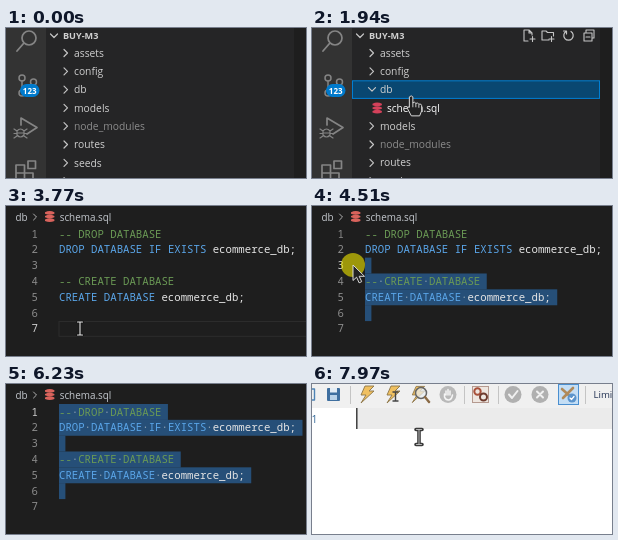
Recreate the animation shown at these times as an HTML page. Size 300 by 150 pixels, loop 8 s.

```html
<!DOCTYPE html>
<html lang="en">
<head>
<meta charset="utf-8">
<title>Schema walkthrough</title>
<style>
html, body { margin: 0; width: 100%; height: 100%; overflow: hidden; background: #1e1e1e; }
svg { display: block; width: 100vw; height: 100vh; }
text { white-space: pre; }
.ui { font: 10.3px "Open Sans", "Noto Sans", sans-serif; fill: #d0d0d0; }
.code { font: 500 10.68px "Noto Sans Mono", "DejaVu Sans Mono", monospace; fill: #e4e4e4; }
.line { fill: none; stroke-linecap: round; stroke-linejoin: round; }
</style>
</head>
<body>
<svg id="stage" viewBox="0 0 300 150"></svg>
<script>
const LOOP = 8000;
const CHAR = 6.408, CODE_X = 53, CODE_TOP = 20, LINE = 15.83, ROW = 18.3;
const stage = document.getElementById('stage');
const $ = id => document.getElementById(id);
const show = (id, on) => $(id).setAttribute('visibility', on ? 'visible' : 'hidden');
const clamp = (v, lo, hi) => Math.min(hi, Math.max(lo, v));
const between = (t, a, b) => t >= a && t < b;

// ---- drawing helpers ----
const rect = (x, y, w, h, fill, more = '') =>
  `<rect x="${x}" y="${y}" width="${w}" height="${h}" fill="${fill}" ${more}/>`;
const line = (d, color, width = 1.2, more = '') =>
  `<path class="line" d="${d}" stroke="${color}" stroke-width="${width}" ${more}/>`;
const shape = (d, fill, more = '') => `<path d="${d}" fill="${fill}" ${more}/>`;
const disc = (x, y, r, fill, more = '') => `<circle cx="${x}" cy="${y}" r="${r}" fill="${fill}" ${more}/>`;
const label = (x, y, s, more = '') => `<text class="ui" x="${x}" y="${y}" ${more}>${s}</text>`;
const group = (id, body, more = '') => `<g id="${id}" ${more}>${body}</g>`;
const chevron = (x, y, open) =>
  line(open ? `M${x - 3.5} ${y - 2}l3.5 3.5 3.5-3.5` : `M${x - 2} ${y - 3.5}l3.5 3.5-3.5 3.5`, '#c5c5c5');
const database = (x, y, color) => [0, 3.6, 7.2].map(dy =>
  shape(`M${x} ${y + dy + 1.3}q4.700-2.400 9.400 0v1.400q-4.700 2.300-9.400 0z`, color)).join('');

// ---- file tree ----
const rowY = i => 25 + ROW * i;
const folder = (name, i, open) => chevron(60, rowY(i), open) +
  label(68, rowY(i) + 3.7, name, name === 'node_modules' ? 'style="fill:#8c8c8c"' : '');
const selectedRow = (id, i) => rect(40.5, rowY(i) - 8.8, 247, 17.6, '#094771', `id="${id}" stroke="#007fd4"`);

function activityBar() {
  const c = '#858585';
  return rect(0, 0, 40, 150, '#333') +
    disc(23, 10, 7, 'none', `stroke="${c}" stroke-width="1.7"`) + line('M17.5 15.5L11 23', c, 1.8) +
    [[16, 50], [27.5, 54], [16, 65]].map(([x, y]) =>
      disc(x, y, 3, 'none', `stroke="${c}" stroke-width="1.5"`)).join('') +
    line('M16 53v9M27.5 57q-1 4-11 4', c, 1.5) +
    rect(14, 56, 19.5, 13, '#007acc', 'rx="6.5"') +
    label(23.7, 65.6, '123', 'text-anchor="middle" style="font-size:8px;font-weight:700;fill:#fff"') +
    line('M15 97V90L31 99.5 21 106', c, 1.7) +
    line('M11 103q3.5-4 7 0v4q-3.5 4-7 0zM11 105h7M8 101l3 2M8 105.5h3M8 110l3-2M21 101l-3 2M21 105.5h-3M21 110l-3-2', c, 1.2) +
    line('M10 137h8.5v16H10zM10 145h17v8M22 133h7.5v7.5h-7.5z', c, 1.7);
}

function headerIcons() {
  const c = '#c5c5c5';
  return group('headerIcons',
    line('M216 13h-4V2h5l3 3v2M217 2v3h3M218 11h5M220.5 8.5v5', c, 1.1) +
    line('M237 12h-7V3h4l1.5 1.5h6V8M237 11h5M239.5 8.5v5', c, 1.1) +
    line('M254 3.5a4.7 4.7 0 1 0 5 0M251.5 3h3v3', c, 1.2) +
    line('M274 4V2h8v8h-2M272 5h8v8h-8zM274 9h4', c, 1.1));
}

function explorer() {
  const head = ['assets', 'config'], tail = ['models', 'node_modules', 'routes', 'seeds'];
  return group('explorer',
    rect(0, 0, 300, 150, '#1e1e1e') + rect(40, 0, 248, 150, '#252526') + activityBar() +
    chevron(48, 8, true) + label(57, 11.2, 'BUY-M3', 'style="font-size:9.1px;font-weight:700"') + headerIcons() +
    selectedRow('dbSelected', 2) + selectedRow('fileSelected', 3) +
    rect(40, rowY(3) - 9, 248, 18, '#2a2d2e', 'id="fileHover"') +
    head.map((n, i) => folder(n, i)).join('') +
    group('dbClosed', folder('db', 2)) +
    group('dbOpen', folder('db', 2, true) + database(60.5, 74.5, '#d4415a') +
      label(75, rowY(3) + 3.7, 'schema.sql', 'style="font-size:10.1px;fill:#fff"')) +
    group('tail', tail.map((n, i) => folder(n, i + 3)).join('') + chevron(60, rowY(7))));
}

// ---- code editor ----
const code = [
  '-- DROP DATABASE', 'DROP DATABASE IF EXISTS ecommerce_db;', '',
  '-- CREATE DATABASE', 'CREATE DATABASE ecommerce_db;', '', ''
];
const lineTop = i => CODE_TOP + LINE * i;

function colored(s) {
  if (s.startsWith('--')) return `<tspan fill="#6a9955">${s}</tspan>`;
  return s.replace(/\b[A-Z]+\b/g, '<tspan fill="#5aa5e8">$&</tspan>');
}

function editor() {
  const rows = code.map((s, i) => {
    const y = lineTop(i) + 11.5;
    const dots = s.replace(/[^ ]/g, '\u00a0').replace(/ /g, '·');
    return group('sel' + i,
      rect(CODE_X, lineTop(i), (s.length + 1) * CHAR, LINE + 0.1, '#264f78') +
      `<text class="code" x="${CODE_X}" y="${y}" style="fill:#8fa3b5">${dots}</text>`) +
      `<text class="code" id="num${i}" x="25.5" y="${y}">${i + 1}</text>` +
      `<text class="code" x="${CODE_X}" y="${y}">${colored(s)}</text>`;
  }).join('');
  const crumb = 'style="font-size:9.9px;fill:#c4c8ce"';
  return group('editor', rect(0, 0, 300, 150, '#1e1e1e') +
    label(9.5, 14.8, 'db', crumb) + line('M27.5 8l3 3-3 3', '#b0b0b0', 1) +
    database(39, 5, '#d9635c') + label(53.7, 14.8, 'schema.sql', crumb) +
    rect(CODE_X, lineTop(6) + .5, 250, LINE - 1, 'none', 'id="lineBox" stroke="#2c2c2c"') + rows +
    rect(CODE_X, 0, 1.2, LINE, '#aeafad', 'id="caret"'));
}

// ---- query tool ----
const bolt = (x, y, s = 1) => shape('M7-8H-2L-6 1h5l-5 8L7-3H2z', '#f0c060',
  `stroke="#8b7448" stroke-width=".9" transform="translate(${x} ${y}) scale(${s})"`);
const separator = x => rect(x, 2, 1, 18, '#c4c4c4');
const button = (x, mark) => disc(x, 10.5, 8.5, '#b0b0b0') + line(mark, '#f0f0f0', 2);

function queryTool() {
  return group('queryTool', rect(0, 0, 300, 150, '#fff') + rect(0, 0, 300, 24, '#f0f0f0') +
    line('M0 5h2.500v11H0', '#4d83b5', 1.4) +
    rect(15, 4, 13, 13, '#3f6f9f', 'rx="1"') + rect(18, 4, 7, 4.5, '#e4edf5') + rect(18, 11, 7, 5, '#b9d2e8') +
    separator(38) + bolt(55, 10) + bolt(81, 10) +
    line('M81 8h5M83.5 8v9M81 17h5', '#444', 1.4) +
    bolt(106, 10, .95) + disc(109, 9, 5.5, '#e8eef2', 'fill-opacity=".7" stroke="#666" stroke-width="1.5"') +
    line('M113 13l4 5', '#8a6a45', 2.4) +
    disc(136, 10.5, 8.5, '#b9b9b9') +
    line('M132.5 10v3q1 3 4 3t4-5M134 11V7M136 11V5.5M138 11V7', '#f5f5f5', 1.5) +
    separator(152) + rect(160.5, 2.5, 16, 16, '#eee6e0', 'stroke="#b59a90"') +
    disc(165.5, 7.5, 3.2, 'none', 'stroke="#a8503a" stroke-width="2"') +
    disc(171.5, 13, 3.5, 'none', 'stroke="#6f3b2e" stroke-width="2"') +
    separator(186) + button(201, 'M197 10.5l3 3.5 5.5-7') + button(228, 'M225 7.5l6 6M231 7.5l-6 6') +
    rect(246.5, .5, 20, 20, '#c4def5', 'stroke="#4a8fd0"') +
    line('M250 5l11 10M261 4l-10 10', '#b08a5a', 2.6) +
    disc(260, 14, 4.5, '#5b94cc') + line('M258 14l1.5 1.5 2.5-3', '#fff', 1.2) +
    separator(273) + label(281.5, 14, 'Limit to 1000 rows', 'style="font-size:9.6px;fill:#1f2f50"') +
    rect(46, 24, 254, 21, '#ebebeb') +
    label(-.5, 38.7, '1', 'style="font-size:10.5px;fill:#356a9a"') +
    rect(44, 24, 1.6, 21, '#444', 'id="queryCaret"'));
}

// ---- pointer ----
const beam = (w, h) => `M${-w} ${-h}H${w}M0 ${-h}V${h}M${-w} ${h}H${w}`;
const outline = 'stroke="#d8d8d8" stroke-width="1" stroke-linejoin="round"';

function pointer() {
  return group('pointer',
    disc(0, 0, 12, '#e6dc00', 'id="press" fill-opacity=".64"') +
    group('arrow', shape('M0 0V15.5l3.6-3.3 2.5 5.6 2.6-1.1-2.5-5.4H11.5z', '#222', outline)) +
    group('hand', shape('M1 1q2-2 3.5 0v6q2-1.5 3 .5 2-1 3 .8 2.5-.8 2.8 1.5v5.2l-2 5H3l-4-7.5q0-2.5 2 -1z', '#222', outline) +
      line('M4.5 7v4M7.5 8v3M10.5 9v2.5', '#d8d8d8', .9)) +
    group('beam', line(beam(2.5, 6.5), '#111', 2.6) + line(beam(2.5, 6.5), '#e8e8e8', 1.1)) +
    group('darkBeam', line(beam(3, 7.5), '#3a3a3a', 3.6) + line(beam(2.5, 7.5), '#c4c4c4', .9)));
}

// Each visit: [time, x, y] points; the pointer is hidden outside them.
const visits = [
  [[310, 145, 126], [700, 62, 92], [1060, 92, 57], [1650, 92, 57], [2200, 100, 77], [2370, 100, 77], [2560, 112, 122]],
  [[3560, 84, 122], [3770, 74, 122.5], [3900, 56, 122], [4300, 37, 83], [4510, 41, 59], [4700, 43, 22], [5100, 43, 22],
   [5300, 89, 43], [5440, 92, 46], [5890, 198, 144]],
  [[7290, 258, 130], [7960, 107, 53], [8000, 107, 53]]
];
const presses = [[1260, 1400], [2270, 2370], [3900, 5100]];
const shapes = [[0, 'arrow'], [1120, 'hand'], [3000, 'beam'], [4120, 'arrow'], [5200, 'beam'], [6770, 'darkBeam']];

function locate(t) {
  const path = visits.find(p => between(t, p[0][0], p.at(-1)[0]));
  if (!path) return null;
  const i = path.findIndex(p => p[0] > t), [t0, x0, y0] = path[i - 1], [t1, x1, y1] = path[i];
  const u = (t - t0) / (t1 - t0), k = u * u * (3 - 2 * u);
  return [x0 + (x1 - x0) * k, y0 + (y1 - y0) * k];
}

function activeLine(t, pos) {
  if (t < 3900) return 6;
  if (t >= 5100 || !pos) return 0;
  return clamp(Math.floor((pos[1] - CODE_TOP) / LINE), 0, 6);
}

function render(t) {
  const pos = locate(t), active = activeLine(t, pos);
  const opened = t >= 1400;

  show('headerIcons', t >= 310);
  show('dbSelected', between(t, 1400, 2270));
  show('fileHover', between(t, 1950, 2270));
  show('fileSelected', t >= 2270);
  show('dbClosed', !opened);
  show('dbOpen', opened);
  $('tail').setAttribute('transform', `translate(0 ${opened ? ROW : 0})`);

  $('editor').setAttribute('opacity', clamp((t - 3110) / 250, 0, 1));
  $('queryTool').setAttribute('opacity', t < 6770 ? 0 : t < 6820 ? .5 : 1);

  code.forEach((_, i) => {
    show('sel' + i, i >= active && i < 6);
    $('num' + i).style.fill = i === active ? '#d0d0d0' : '#8c8c8c';
  });
  $('caret').setAttribute('y', lineTop(active));
  show('lineBox', active === 6);
  show('caret', between(t, 5700, 6230));
  show('queryCaret', !between(t, 7320, 7850));

  show('pointer', pos);
  if (pos) $('pointer').setAttribute('transform', `translate(${pos[0]} ${pos[1]})`);
  const current = shapes.filter(s => s[0] <= t).pop()[1];
  for (const id of ['arrow', 'hand', 'beam', 'darkBeam'])
    $(id).setAttribute('display', id === current ? 'inline' : 'none');
  $('press').setAttribute('display', presses.some(p => between(t, ...p)) ? 'inline' : 'none');
}

stage.innerHTML = explorer() + editor() + queryTool() + pointer();
const start = performance.now();
function tick() {
  render((performance.now() - start) % LOOP);
  requestAnimationFrame(tick);
}
tick();
</script>
</body>
</html>
```
